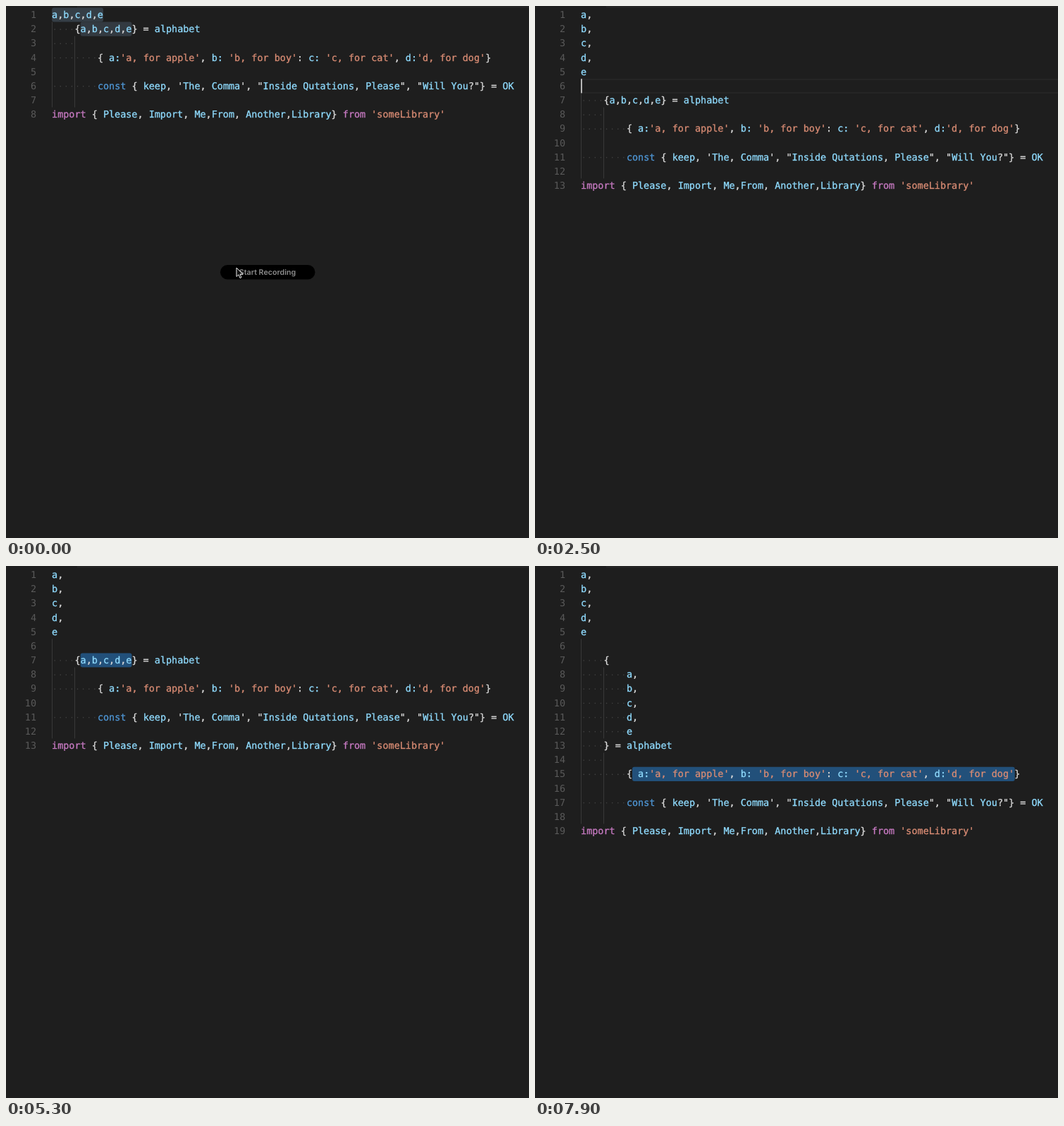
An HTML page for the animation above (8 s loop, 742 by 754 pixels).

```html
<!DOCTYPE html>
<html lang="en">
<head>
<meta charset="utf-8">
<title>Editor</title>
<style>
  html, body { margin: 0; width: 100%; height: 100%; overflow: hidden; background: #1e1e1e; }
  svg { display: block; }
  text { white-space: pre; text-rendering: geometricPrecision; }
  .code text { font: 13.455px "DejaVu Sans Mono", "Liberation Mono", monospace; stroke-width: .3px; }
  .plain { fill: #d8d8d8; stroke: #d8d8d8; }
  .name { fill: #90dcff; stroke: #90dcff; }
  .str { fill: #d98c74; stroke: #d98c74; }
  .key { fill: #c97bc4; stroke: #c97bc4; }
  .decl { fill: #4f97d6; stroke: #4f97d6; }
  .num { fill: #5a5a5a; }
  .guide { fill: #393939; }
  .dot { fill: #444; }
  .label { font: 600 10.7px Inter, "Open Sans", sans-serif; fill: #8c8c8c; }
</style>
</head>
<body>
<svg width="742" height="754" viewBox="0 0 742 754">
  <rect x="101" width="641" height="2.4" fill="#262626"/>
  <g id="current" fill="#292929">
    <rect x="65" width="677" height="1.5"/>
    <rect x="65" y="19" width="677" height="1.5"/>
  </g>
  <rect id="match" height="20.17" rx="3" fill="#333a41"/>
  <rect id="selection" height="20.17" rx="3"/>
  <g id="docs" class="code"></g>
  <rect id="caret" width="1.7" height="20.17" fill="#d0d0d0"/>
  <g id="button">
    <rect x="304" y="367" width="134.5" height="20.5" rx="10.2" fill="#000"/>
    <text class="label" x="371" y="381" text-anchor="middle">Start Recording</text>
  </g>
  <path id="arrow" d="M0 0V12.5L2.9 9.8L5 14.6L7 13.7L5 9.1H9Z" fill="#111" stroke="#eee" stroke-width="1"/>
  <g id="beam" fill="none" stroke-linecap="round">
    <path d="M-2.4 -6Q0 -6 0 -4Q0 -6 2.4 -6M0 -4V4M-2.4 6Q0 6 0 4Q0 6 2.4 6M-1.4 2.5H1.4" stroke="#111" stroke-width="2.6"/>
    <path d="M-2.4 -6Q0 -6 0 -4Q0 -6 2.4 -6M0 -4V4M-2.4 6Q0 6 0 4Q0 6 2.4 6M-1.4 2.5H1.4" stroke="#eee" stroke-width="1.1"/>
  </g>
</svg>
<script>
const LOOP = 8000, TICK = 100;
const LEFT = 65.1, TOP = 2.4, CHAR = 8.1, LINE = 20.17;
const $ = id => document.getElementById(id);
const colX = col => LEFT + col * CHAR;
const lineY = line => TOP + (line - 1) * LINE;

const letters = ["a,", "b,", "c,", "d,", "e"];
const pad = " ".repeat(4);
const rest = [
  pad,
  pad + pad + "{ a:'a, for apple', b: 'b, for boy': c: 'c, for cat', d:'d, for dog'}",
  "",
  pad + pad + `const { keep, 'The, Comma', "Inside Qutations, Please", "Will You?"} = OK`,
  "",
  "import { Please, Import, Me,From, Another,Library} from 'someLibrary'"
];
const inline = pad + "{a,b,c,d,e} = alphabet";
const spread = [pad + "{", ...letters.map(s => pad + pad + s), pad + "} = alphabet"];

// guides: [column, first line, last line]
const docs = [
  { lines: ["a,b,c,d,e", inline, ...rest], guides: [[0, 2, 7], [4, 3, 7]] },
  { lines: [...letters, "", inline, ...rest], guides: [[0, 6, 12], [4, 8, 12]] },
  { lines: [...letters, "", ...spread, ...rest], guides: [[0, 6, 18], [4, 8, 12], [4, 14, 18]] }
];

function tokenClass(token) {
  if (token[0] === "'" && token.length > 2 && token.endsWith("'")) return "str";
  if (token === "import" || token === "from") return "key";
  if (token === "const") return "decl";
  return /^\w/.test(token) ? "name" : "plain";
}

function drawLine(line, i) {
  const y = lineY(i + 1), base = y + 14.7;
  const indent = line.match(/^ */)[0].length;
  const body = line.slice(indent);
  const pattern = body.startsWith("const") ? /\w+|\W+/g : /'[^']*'|\w+:?|[^\w']+/g;
  const spans = (body.match(pattern) || [])
    .map(t => `<tspan class="${tokenClass(t)}">${t}</tspan>`).join("");
  let out = `<text class="num" x="43" y="${base}" text-anchor="end">${i + 1}</text>`;
  for (let c = 0; c < indent; c++)
    out += `<circle class="dot" cx="${colX(c + .5)}" cy="${y + 10.6}" r=".8"/>`;
  return out + `<text x="${colX(indent)}" y="${base}">${spans}</text>`;
}

function drawGuide([col, first, last]) {
  const height = (last - first + 1) * LINE;
  return `<rect class="guide" x="${Math.floor(colX(col))}" y="${lineY(first)}" width="1" height="${height}"/>`;
}

$("docs").innerHTML = docs.map(d =>
  `<g>${d.guides.map(drawGuide).join("")}${d.lines.map(drawLine).join("")}</g>`).join("");
const pages = [...$("docs").children];

// [time, document, line, anchor column, caret column, selection end time, end column]
const steps = [
  [0, 0, 1, 9, 0],
  [500, 0, 1, 9, 0],
  [2500, 1, 6, 0, 0],
  [2800, 1, 7, 0, 0],
  [3000, 1, 8, 0, 0],
  [3800, 1, 7, 0, 0],
  [4000, 1, 7, 4, 4],
  [4100, 1, 7, 5, 5, 4700, 14],
  [5400, 2, 14, 4, 4],
  [6300, 2, 15, 4, 4],
  [6400, 2, 15, 8, 8],
  [6500, 2, 15, 9, 9, 7300, 76]
];

// [time, x, y]
const mouse = [[0, 327, 371], [200, 327, 371], [500, 262, 215], [800, 165, 40],
  [1000, 153.5, 19.5], [1400, 200, 19.5], [1900, 350.5, 21]];
const MOUSE_HIDE = 2300, FOCUS = 500;

const clamp = v => Math.min(1, Math.max(0, v));
const show = (el, on) => el.style.display = on ? "" : "none";
const move = (el, x, y) => el.setAttribute("transform", `translate(${x} ${y})`);

function pointAt(t) {
  const i = mouse.findLastIndex(p => p[0] <= t);
  const a = mouse[i], b = mouse[i + 1] || a;
  const k = b === a ? 0 : (t - a[0]) / (b[0] - a[0]);
  return [a[1] + (b[1] - a[1]) * k, a[2] + (b[2] - a[2]) * k];
}

function mark(el, line, from, to) {
  const on = from !== to;
  show(el, on);
  if (!on) return;
  el.setAttribute("x", colX(Math.min(from, to)));
  el.setAttribute("y", lineY(line));
  el.setAttribute("width", Math.abs(to - from) * CHAR);
}

function render(t) {
  const [start, doc, line, anchor, from, end = start, endCol = from] =
    steps.findLast(s => s[0] <= t);
  const grow = end > start ? clamp((t - start) / (end - start)) : 0;
  const col = Math.round(from + (endCol - from) * grow);
  const focused = t >= FOCUS;

  pages.forEach((page, i) => show(page, i === doc));
  mark($("selection"), line, anchor, col);
  $("selection").setAttribute("fill", focused ? "#22507a" : "#353e46");
  mark($("match"), 2, 5, doc === 0 ? 14 : 5);

  show($("current"), focused && anchor === col);
  move($("current"), 0, lineY(line));

  const idle = t - Math.min(t, end);
  show($("caret"), focused && idle % 1000 <= 500);
  move($("caret"), colX(col), lineY(line));

  $("button").style.opacity = 1 - clamp(t / 300);
  const [x, y] = pointAt(t);
  const arrow = t <= 200;
  show($("arrow"), arrow);
  show($("beam"), !arrow && t < MOUSE_HIDE);
  move($("arrow"), x, y);
  move($("beam"), x, y);
}

function frame(now) {
  render(Math.floor(now % LOOP / TICK) * TICK);
  requestAnimationFrame(frame);
}
render(0);
requestAnimationFrame(frame);
</script>
</body>
</html>
```
